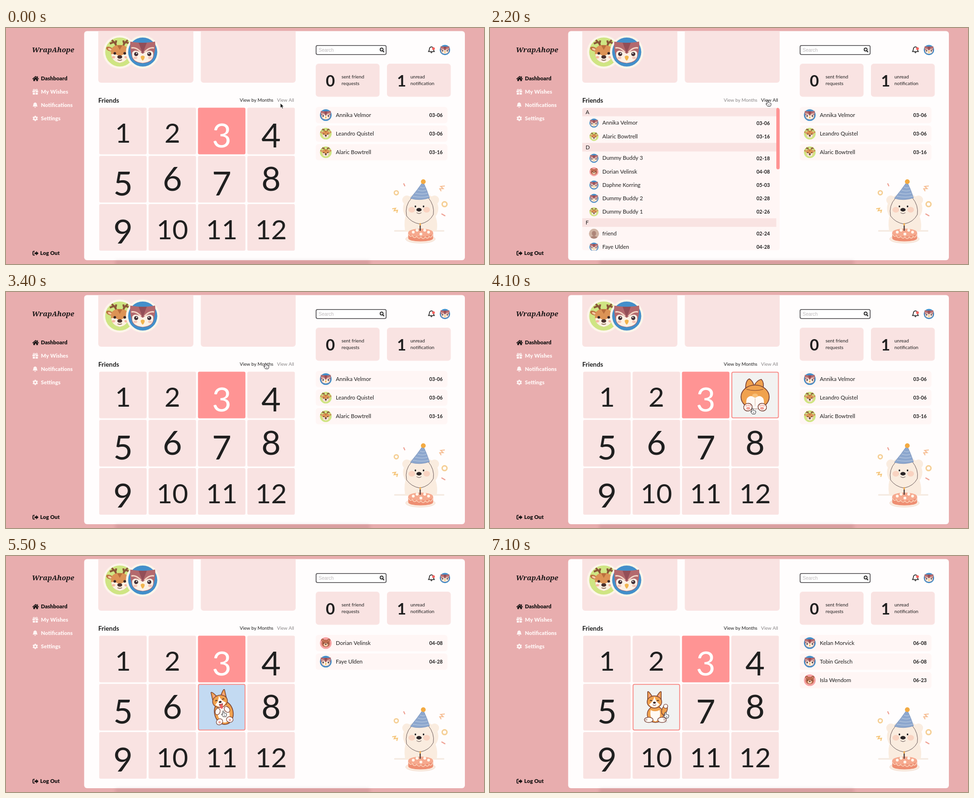
Animation, 1000 px wide and 496 px high, one loop 7.2 s. Source, as an HTML page with a canvas:

```html
<!DOCTYPE html>
<html lang="en">
<head>
<meta charset="utf-8">
<title>Birthday dashboard</title>
<style>
html, body { margin: 0; width: 100%; height: 100%; overflow: hidden; background: #e8adae; }
canvas { display: block; width: 100vw; height: 100vh; }
</style>
</head>
<body>
<canvas id="stage"></canvas>
<script>
const W = 1000, H = 496, LOOP = 7200, STEP = 100;
const canvas = document.getElementById('stage');
const ctx = canvas.getContext('2d');
const dpr = window.devicePixelRatio || 1;
canvas.width = W * dpr;
canvas.height = H * dpr;

const BG = '#e8adae', CARD = '#f9e3e2', ROSE = '#ff9494', INK = '#1f1f1f', ROW = '#fff6f5';
const SANS = 'Lato, "Open Sans", sans-serif';

// Drawing helpers
function box(x, y, w, h, r, fill, stroke, lw = 1) {
  ctx.beginPath();
  ctx.roundRect(x, y, w, h, r);
  paint(fill, stroke, lw);
}
function paint(fill, stroke, lw = 1) {
  if (fill) { ctx.fillStyle = fill; ctx.fill(); }
  if (stroke) { ctx.strokeStyle = stroke; ctx.lineWidth = lw; ctx.stroke(); }
}
function oval(x, y, rx, ry, fill, stroke, lw, turn = 0) {
  ctx.beginPath();
  ctx.ellipse(x, y, rx, ry, turn, 0, Math.PI * 2);
  paint(fill, stroke, lw);
}
function disc(x, y, r, fill, stroke, lw) { oval(x, y, r, r, fill, stroke, lw); }
function path(d, fill, stroke, lw = 1) {
  const p = new Path2D(d);
  if (fill) { ctx.fillStyle = fill; ctx.fill(p); }
  if (stroke) { ctx.strokeStyle = stroke; ctx.lineWidth = lw; ctx.stroke(p); }
}
function text(s, x, y, size, color = INK, weight = 400, align = 'left', family = SANS) {
  ctx.font = `${weight} ${size}px ${family}`;
  ctx.textAlign = align;
  ctx.fillStyle = color;
  ctx.fillText(s, x, y);
}
function at(x, y, scale, draw) {
  ctx.save();
  ctx.translate(x, y);
  ctx.scale(scale, scale);
  draw();
  ctx.restore();
}
function mirror(draw) { draw(-1); draw(1); }

// Avatars live in a unit circle
const avatars = {
  deer() {
    disc(0, 0, 1, '#cfe583');
    mirror(s => {
      path(`M${.2 * s} -.3 Q${.25 * s} -.6 ${.55 * s} -.82 M${.3 * s} -.55 L${.24 * s} -.8 M${.42 * s} -.68 L${.68 * s} -.58`, null, '#8b5637', .13);
      oval(.68 * s, -.2, .27, .14, '#bb7240', null, 0, -.4 * s);
      oval(.66 * s, -.18, .16, .07, '#f6c9a5', null, 0, -.4 * s);
    });
    path('M-.6 -.1 Q-.5 -.5 0 -.48 Q.5 -.5 .6 -.1 Q.66 .6 0 .75 Q-.66 .6 -.6 -.1z', '#dc9355');
    path('M-.58 .15 Q-.25 .1 0 .32 Q.25 .1 .58 .15 Q.55 .65 0 .75 Q-.55 .65 -.58 .15z', '#fdf1e2');
    path('M-.18 -.47 L0 -.15 L.18 -.47z', '#b96e3c');
    mirror(s => {
      disc(.34 * s, .09, .09, '#3b2928');
      oval(.43 * s, .36, .11, .08, '#f5b8a0');
    });
    oval(0, .34, .17, .12, '#48302d');
    path('M-.15 .53 Q0 .62 .15 .53', null, '#724b3c', .05);
  },
  owl() {
    disc(0, 0, 1, '#438fca');
    path('M-.85 -.72 Q-.5 -.65 0 -.64 Q.5 -.65 .85 -.72 Q.9 -.3 .77 .2 Q.7 .75 0 .77 Q-.7 .75 -.77 .2 Q-.9 -.3 -.85 -.72z', '#b3696d');
    path('M-.72 .05 Q-.55 -.28 0 .12 Q.55 -.28 .72 .05 Q.8 .68 0 .75 Q-.8 .68 -.72 .05z', '#fdf1e5');
    path('M-.28 -.64 L0 .1 L.28 -.64z', '#934e57');
    mirror(s => {
      path(`M${.12 * s} .02 Q${.45 * s} -.36 ${.78 * s} -.28`, null, '#f3d4c4', .1);
      disc(.45 * s, .14, .14, '#422f35');
      disc(.42 * s, .09, .04, '#fff');
      oval(.5 * s, .4, .13, .08, '#f6c5b6');
    });
    path('M-.14 .31 Q0 .18 .14 .31 Q.12 .5 0 .6 Q-.12 .5 -.14 .31z', '#f2b54d');
  },
  bear() {
    disc(0, 0, 1, '#f7a3a4');
    mirror(s => {
      disc(.52 * s, -.5, .25, '#a95846');
      disc(.52 * s, -.48, .13, '#dd9272');
    });
    oval(0, .06, .72, .64, '#bd6c50');
    oval(0, .3, .33, .27, '#f4d3b4');
    mirror(s => disc(.37 * s, 0, .09, '#432b29'));
    oval(0, .2, .14, .1, '#432b29');
  },
  photo() {
    disc(0, 0, 1, '#d0b4a4');
    ctx.save();
    ctx.clip();
    oval(0, -.05, .42, .5, '#ad8578');
    oval(0, .95, .75, .5, '#ad8578');
    ctx.restore();
  }
};
function avatar(kind, x, y, r) { at(x, y, r, avatars[kind]); }

const BELL = 'M0 -5.6 C-3 -5.1 -3.7 -3 -3.8 -.5 C-3.9 1.3 -4.7 2.2 -5.2 3 H5.2 C4.7 2.2 3.9 1.3 3.8 -.5 C3.7 -3 3 -5.1 0 -5.6z';

function sidebar() {
  const pale = '#fff4f3', black = '#151212';
  text('WrapAhope', 54, 51, 14.6, '#1b1718', 'italic 700', 'left', '"Noto Serif", serif');
  path('M62 100.8 L55 106.8 l1 1.1 l6 -5.1 l6 5.1 l1 -1.1 l-2.4 -2.1 v-3.2 h-1.7 v1.7z M57.2 107.7 l4.8 -4.1 l4.8 4.1 v3.9 h-3.5 v-3.2 h-2.6 v3.2 h-3.5z', black);
  path('M55.3 131.7 h12 v3.1 h-5.4 v-3.1 h-1.2 v3.1 h-5.4z M56 135.7 h4.7 v4.3 h-4.7z M61.9 135.7 h4.7 v4.3 h-4.7z', pale);
  oval(59, 130.3, 2.1, 1.3, null, pale, 1.2, .4);
  oval(63.6, 130.3, 2.1, 1.3, null, pale, 1.2, -.4);
  at(61, 162, 1, () => {
    path(BELL, pale);
    path('M-1.7 3.9 A1.7 1.7 0 0 0 1.7 3.9z', pale);
  });
  at(61.2, 190, 1, () => {
    for (let i = 0; i < 6; i++) {
      ctx.rotate(Math.PI / 3);
      box(-1.5, -5.6, 3, 4, .6, pale);
    }
    disc(0, 0, 4.2, pale);
    disc(0, 0, 1.8, BG);
  });
  path('M60 469.4 h-2.2 q-1.4 0 -1.4 1.4 v5.2 q0 1.4 1.4 1.4 h2.2', null, black, 1.8);
  path('M59.7 471.8 h3.5 v-2.7 l4.8 4.4 l-4.8 4.4 v-2.7 h-3.5z', black);
  ['Dashboard', 'My Wishes', 'Notifications', 'Settings'].forEach((s, i) =>
    text(s, 73, 110.3 + i * 28, 11.3, i ? pale : black, 900));
  text('Log Out', 71.5, 477.3, 11.3, black, 900);
}

function panel() {
  ctx.fillStyle = BG;
  ctx.fillRect(0, 0, W, H);
  box(163.5, 6.5, 796.5, 481.5, 6, '#fffdfd');
  ctx.save();
  ctx.filter = 'blur(3px)';
  box(228, 488, 534, 12, 5, 'rgba(110,60,65,.13)');
  ctx.restore();
  box(193, 6.5, 199, 108.5, [0, 0, 6, 6], CARD);
  box(407.5, 6.5, 198.5, 108.5, [0, 0, 6, 6], CARD);
  [['deer', 238], ['owl', 286]].forEach(([kind, x]) => {
    disc(x, 50.5, 35, '#fdf5ea');
    avatar(kind, x, 50.5, 30.5);
  });
}

function header() {
  box(648.7, 36.7, 146.6, 19, 3, '#fff', '#4b494c', 1.6);
  text('Search', 654, 50, 10, '#bfbbbd', 400, 'left', '"Liberation Sans", Arial, sans-serif');
  disc(785.8, 45.3, 3.1, null, INK, 1.7);
  path('M788 47.7 l3 3', null, INK, 2);
  at(890, 46, 1.18, () => {
    path(BELL, null, INK, 1.3);
    path('M-1.7 4 A1.7 1.7 0 0 0 1.7 4z', INK);
  });
  disc(894.3, 43.3, 2.9, '#f4625f');
  avatar('owl', 918.3, 46.2, 10.8);
  [[648, '0', 'sent friend', 'requests'], [797, '1', 'unread', 'notification']].forEach(([x, n, a, b], i) => {
    box(x, 75, 133.5, 69.5, 6, CARD);
    text(n, x + 21, 123, 33, INK, 700);
    text(a, x + 54 - i * 5, 106.3, 10);
    text(b, x + 54 - i * 5, 119.6, 10);
  });
}

const months = {
  3: [['owl', 'Annika Velmor', '03-06'], ['deer', 'Leandro Quistel', '03-06'], ['deer', 'Alaric Bowtrell', '03-16']],
  4: [['bear', 'Dorian Velinsk', '04-08'], ['owl', 'Faye Ulden', '04-28']],
  6: [['owl', 'Kelan Morvick', '06-08'], ['owl', 'Tobin Grelsch', '06-08'], ['bear', 'Isla Wendom', '06-23']],
  7: [['owl', 'Clarisse Tovan', '07-18']]
};
const friends = [
  'A', months[3][0], months[3][2],
  'D', ['owl', 'Dummy Buddy 3', '02-18'], months[4][0], ['owl', 'Daphne Korring', '05-03'],
  ['owl', 'Dummy Buddy 2', '02-28'], ['deer', 'Dummy Buddy 1', '02-26'],
  'F', ['photo', 'friend', '02-24'], months[4][1]
];

function upcoming(month) {
  months[month].forEach(([kind, name, date], i) => {
    const y = 183 + i * 39;
    box(648, y - 17.3, 275.5, 34.6, 6, ROW);
    avatar(kind, 669, y, 12.3);
    text(name, 690, y + 3.7, 11.5);
    text(date, 913.5, y + 3.7, 10.4, INK, 700, 'right');
  });
}

function allFriends() {
  ctx.save();
  ctx.beginPath();
  ctx.roundRect(193, 167.5, 413, 300, 5);
  ctx.clip();
  box(193, 167.5, 413, 300, 0, ROW);
  let y = 167.5;
  for (const item of friends) {
    if (typeof item === 'string') {
      box(193, y, 406, 18, 0, CARD);
      text(item, 200, y + 13, 11.5);
      y += 18;
    } else {
      const [kind, name, date] = item;
      avatar(kind, 217.5, y + 14.3, kind === 'photo' ? 10.5 : 9.5);
      text(name, 235, y + 17.9, 11.5);
      text(date, 585.5, y + 18, 10.4, INK, 700, 'right');
      y += 28.1;
    }
    if (item === friends[2]) y -= .2;
  }
  box(599, 167.5, 7, 129.5, 4, ROSE);
  ctx.restore();
}

// Corgi pictures, centred on their tile
const FUR = '#f0a24e', LINE = '#794034', PINK = '#f3a49c';
function rump() {
  path('M-20 -14 Q-20 -32 -12 -35 Q-5 -31 -2 -20 Q3 -32 13 -34 Q20 -27 16 -13z', FUR, LINE, 1.6);
  oval(0, 3, 29.5, 25, FUR, LINE, 1.7);
  path('M-18 -13 Q0 -8 17 -13', null, LINE, 1);
  path('M0 5 Q-10 -3 -17 6 Q-22 18 -11 27 Q0 29 11 27 Q22 18 17 6 Q10 -3 0 5z', '#fffaf5');
  path('M0 6 V22', null, '#d8b7a7', 1);
  oval(0, 0, 6, 4, '#f8c079');
  mirror(s => {
    oval(15 * s, 24.5, 9, 8, '#fffaf5', LINE, 1.5, .3 * s);
    oval(14.5 * s, 27, 4, 3, PINK);
    for (let i = -1; i < 2; i++) disc((14.5 + i * 4) * s, 21.5 - (i === 0), 1.6, PINK);
  });
}
function ears(x, y, s) {
  path(`M${x - 14 * s} ${y - 2 * s} L${x - 14 * s} ${y - 21 * s} Q${x - 12 * s} ${y - 24 * s} ${x - 3 * s} ${y - 9 * s}z M${x + 14 * s} ${y - 2 * s} L${x + 14 * s} ${y - 21 * s} Q${x + 12 * s} ${y - 24 * s} ${x + 3 * s} ${y - 9 * s}z`, FUR, LINE, 1.4);
  mirror(k => path(`M${x + 11 * k * s} ${y - 6 * s} V${y - 17 * s} L${x + 6 * k * s} ${y - 9 * s}z`, PINK));
}
function face(x, y, s) {
  ears(x, y, s);
  oval(x, y, 15 * s, 12.5 * s, FUR, LINE, 1.4);
  path(`M${x} ${y - 11 * s} Q${x - 3 * s} ${y} ${x - 11 * s} ${y + 5 * s} Q${x} ${y + 18 * s} ${x + 11 * s} ${y + 5 * s} Q${x + 3 * s} ${y} ${x} ${y - 11 * s}z`, '#fffaf5');
  mirror(k => path(`M${x + 9 * k * s} ${y - 2 * s} q${-2 * k * s} ${-3 * s} ${-4 * k * s} 0`, null, '#382625', 1.4));
  oval(x, y + 1.5 * s, 2.8 * s, 2 * s, '#382625');
}
function lying() {
  ctx.save();
  ctx.rotate(-.22);
  oval(2, 11, 19.5, 25, FUR, LINE, 1.6);
  oval(1, 12, 12.5, 20, '#fffaf5');
  face(-.5, -14, 1.04);
  path('M-4 -9 Q0 -7 4 -9 Q4 -3 0 -2 Q-4 -3 -4 -9z', '#8f3434');
  oval(0, -2.5, 3, 4.8, '#ee6260');
  mirror(s => {
    oval(10 * s, 6, 5, 7, '#fffaf5', LINE, 1.2, -.5 * s);
    oval(11 * s, 28, 7, 6, '#fffaf5', LINE, 1.2, .4 * s);
    disc(11 * s, 29, 2.5, PINK);
  });
  ctx.restore();
}
function waving() {
  oval(0, 30, 24, 2.5, '#dedddd');
  oval(-2, 14, 17, 17, FUR, LINE, 1.4);
  path('M-12 5 Q-3 10 7 5 Q11 24 -2 29 Q-15 24 -12 5z', '#fffaf5');
  oval(17, 5, 5.5, 10, FUR, LINE, 1.4, .35);
  oval(19.5, -3, 4.3, 4.3, '#fffaf5', LINE, 1.2);
  face(-4, -12, 1.02);
  path('M-7.5 -6.5 Q-4 -3 -.5 -6.5', null, LINE, 1.2);
  mirror(s => {
    oval(-2 + 14 * s, 25.5, 9, 5.5, '#fffaf5', LINE, 1.3);
    path(`M${-2 + 18 * s} 23 v4 m${2.3 * s} -3 v3`, null, LINE, .8);
  });
}
const pictures = { 4: rump, 6: waving, 7: lying, 8: waving };

const tileX = n => 195 + (n - 1) % 4 * 103.3;
const tileY = n => 167.5 + Math.floor((n - 1) / 4) * 101.3;
function tileUnder(x, y) {
  for (let n = 1; n <= 12; n++) {
    const dx = x - tileX(n), dy = y - tileY(n);
    if (dx >= 0 && dx <= 99.5 && dy >= 0 && dy <= 98) return n;
  }
  return 0;
}

function monthGrid(hover) {
  for (let n = 1; n <= 12; n++) {
    const x = tileX(n), y = tileY(n), mid = x + 49.7;
    if (n === hover && pictures[n]) {
      box(x + 1, y + 1, 97.5, 96, 3, n === 7 ? '#c3daf2' : '#f2f2f1', '#f8928e', 2);
      at(mid, y + 50, 1, pictures[n]);
      continue;
    }
    box(x, y, 99.3, 98, 3, n === 3 ? ROSE : CARD);
    // Old-style figures: short, descending or ascending
    const short = n < 3 || n > 9, low = [3, 4, 5, 7, 9].includes(n);
    text(n, mid, y + (low ? 83 : 73.5), short ? 57 : 70, n === 3 ? '#fff' : INK, 400, 'center');
  }
}

function party() {
  const cream = '#faecdf', dark = '#57484a', blue = '#8da7ce', gold = '#f5cf95', coral = '#ef9f92';
  disc(816.5, 346.3, 4.2, null, gold, 2.8);
  disc(917.5, 370.3, 5, null, gold, 3);
  path('M831.8 326.5 l2.8 6', null, coral, 2.2);
  path('M911 390.5 l8 4.5', null, coral, 2.2);
  path('M918 332 l-8.5 1 l5 4.5 l-7 .5 l3 5', null, '#f6be94', 2.2);
  path('M808 380 l7 -1 l-3 5 l7 -1 l-1.5 5.5', null, '#f5c579', 2.2);
  box(812, 424.7, 105, 3.3, 1.5, '#f5eae1');
  path('M839 386 Q831 403 835 427 H901 Q905 402 893 386z', cream);
  mirror(s => disc(867.5 + 29 * s, 361.5, 9.5, cream));
  oval(867.5, 379, 37, 32, cream);
  path('M848 358 Q834 373 838 395 Q848 409 866 412 Q886 408 894 392 Q897 373 883 356', null, dark, .9);
  path('M846 358 Q860 341 872.5 323 Q881 341 886 357 Q865 364 846 358z', blue, '#748fb8', .8);
  for (let i = 0; i < 4; i++) {
    const y = 334 + i * 6.5;
    path(`M${866 - i * 5} ${y} Q${873 - i} ${y + 4} ${877 + i * 2.5} ${y}`, null, '#c7d5e6', .9);
  }
  disc(873, 323, 5, '#f3aa42');
  oval(849, 382, 7, 6, '#f9d3c1');
  oval(880, 382, 7, 6, '#f9d3c1');
  oval(856.5, 375, 1.7, 2, '#292426');
  oval(873.5, 375, 1.7, 2, '#292426');
  oval(864, 382, 5.5, 3.7, '#292426');
  path('M859 388 Q864 392 869 388', null, dark, 1);
  oval(867, 443.5, 31, 8.7, '#faebdf', '#efd9c9', .8);
  path('M841.5 430 V442 Q843 448 867 448.5 Q892 448 893.5 442 V430z', '#ee8e72');
  oval(867.5, 430, 26, 8.5, '#f6a98e');
  path('M842 433 q4 8 8 3 q4 8 9 2 q5 7 9 1 q5 7 9 0 q5 6 8 -1 q5 5 8 -5', null, '#f9c7ae', 2);
  [[852, 429], [860, 425], [876, 425], [884, 429], [868, 433]].forEach(([x, y]) => disc(x, y, 3, '#fff5eb'));
  path('M866.5 426 V415', null, '#59443f', 2.5);
  oval(866.5, 412.5, 1.5, 2.7, '#f1aa49');
}

// Pointer stops: time, x, y
const stops = [
  [0, 574, 158], [700, 574, 158], [1200, 581, 152], [2500, 581, 152], [3000, 543, 149],
  [3500, 543, 149], [4000, 549, 244], [4900, 549, 244], [5600, 449, 330],
  [6300, 449, 330], [6700, 367, 328], [LOOP, 367, 328]
];
function pointer(t) {
  const i = stops.findIndex(s => s[0] > t);
  const [t0, x0, y0] = stops[i - 1], [t1, x1, y1] = stops[i];
  const p = (t - t0) / (t1 - t0), e = p * p * (3 - 2 * p);
  return [x0 + (x1 - x0) * e, y0 + (y1 - y0) * e];
}
function drawPointer(x, y, hand) {
  at(x, y, 1, () => {
    if (hand) {
      path('M-1.3 8 V1 Q0 -.8 1.3 1 V5 Q2.6 4 3.5 5.3 Q4.7 4.5 5.4 5.9 Q6.9 5.4 6.9 7 V9 Q6.7 11 5.5 12.5 H-.2 Q-2.2 9.8 -4 7.5 Q-3.6 5.8 -1.3 8z', '#fff', '#252326', 1);
      path('M1.6 8 V10.5 M3.4 8 V10.5', null, '#454245', .7);
    } else {
      path('M0 0 V10 L2.3 7.9 L4 11.6 L5.8 10.8 L4.1 7.2 H7.2z', '#111', '#fff', .8);
    }
  });
}

function render(t) {
  const [px, py] = pointer(t);
  const listing = t >= 1700 && t < 3100;
  const month = t < 4300 ? 3 : t < 5800 ? 4 : t < 6900 ? 7 : 6;
  const hover = listing ? 0 : tileUnder(px, py);
  const onLabel = py > 145 && py < 157 && px > 489 && px < 603 && (px < 559 || px > 567);
  ctx.setTransform(dpr, 0, 0, dpr, 0, 0);
  panel();
  sidebar();
  header();
  upcoming(month);
  party();
  text('Friends', 193, 156.6, 13.4, INK, 700);
  text('View by Months', 489, 154.6, 9.8, listing ? '#888586' : INK);
  text('View All', 567, 154.6, 9.8, listing ? INK : '#888586');
  if (listing) allFriends();
  else monthGrid(hover);
  drawPointer(px, py, onLabel || hover > 0);
}

const start = performance.now();
function tick() {
  const t = (performance.now() - start) % LOOP;
  render(Math.floor(t / STEP) * STEP);
  requestAnimationFrame(tick);
}
tick();
</script>
</body>
</html>
```
